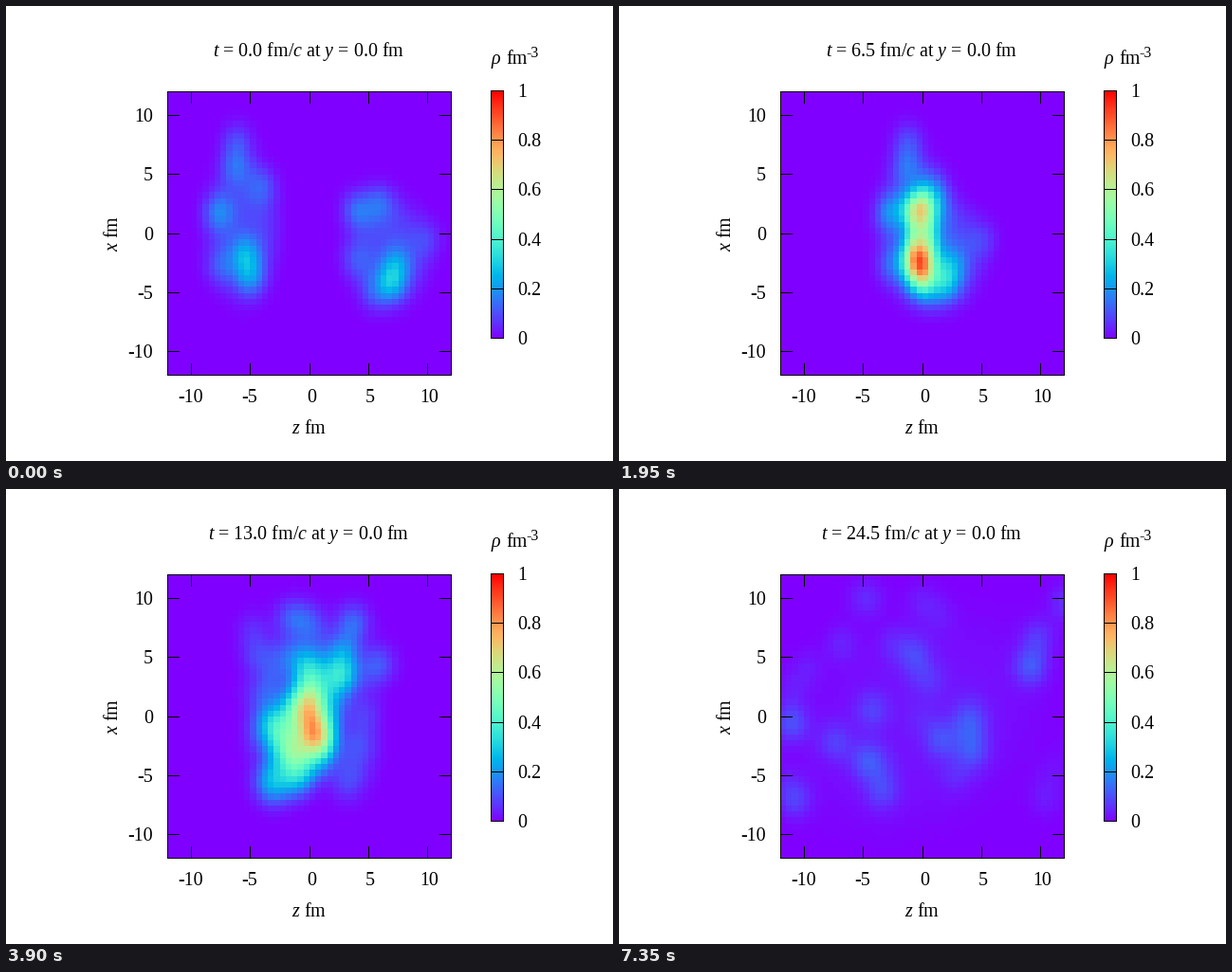
These frames come from a looping animation (640 px wide and 480 px high, 7.5 s). A matplotlib script:

```python
import numpy as np
import matplotlib as mpl
import matplotlib.pyplot as plt
from matplotlib.animation import FuncAnimation

mpl.rcParams.update({
    "font.family": "Liberation Serif",
    "font.size": 14.4,
    "mathtext.fontset": "custom",
    "mathtext.rm": "Liberation Serif",
    "mathtext.it": "Liberation Serif:italic",
})

FRAMES, INTERVAL, DT = 50, 150, 0.5
BEAM = 0.75                 # beam velocity in units of c
T_HIT, T_REF = 8.0, 20.5    # full overlap; time the fragments are given at
LEFT, RIGHT, TOP, BOTTOM = 170, 469, 90, 389

# clumps of the incoming nuclei at t = 0: z, x, peak density
PROJECTILE = [(-6.1, 7.8, .09), (-6.2, 5.7, .11), (-7.7, 1.8, .13),
              (-4, 4, .08), (-5.4, -1.8, .17), (-5, -3.7, .15),
              (-7.6, -2.8, .08)]
TARGET = [(4, 2, .14), (5.9, 2.6, .11), (3.9, -2.2, .07), (6.9, -4.1, .2),
          (7.4, -2.5, .12), (5.5, -5, .07), (10, -.5, .06)]

# the two hot spots: t, z, x, peak density
UPPER = [(4.5, 0, 2.1, .27), (8.5, -.8, 2.1, .22), (13, 0, 1.2, .28),
         (16.5, -.9, .6, .22), (20.5, -1, 2, 0)]
LOWER = [(4.5, -.7, -3.1, .2), (8.5, .2, -2.3, .36), (13, .3, -1, .32),
         (16.5, 1.4, -.1, .33), (20.5, 3.4, .6, .16), (24.5, 4, -.6, .1)]

# bright fragments at T_REF, then a seeded haze of faint ones
FRAGMENTS = [(9.2, 9, .08), (7.4, 6.3, .08), (6.9, 4, .13), (-.5, 5, .08),
             (-5.2, 5.8, .05), (-3.2, .5, .08), (-8.4, -.4, .1),
             (-5.6, -2, .08), (-3.6, -3.5, .1), (-2.6, -5.9, .09),
             (-8.1, -6.7, .08), (1.2, -1.8, .1), (3.2, -2.8, .09),
             (-10.7, 5.8, .05), (14.5, 5, .07)]
rng = np.random.default_rng(4)
haze = rng.uniform([-13, -10, .015], [13, 10, .045], (24, 3))

edges = np.linspace(-12, 12, 49)
Z, X = np.meshgrid(edges, edges)


def ease(t, a, b):
    s = np.clip((t - a) / (b - a), 0, 1)
    return s * s * (3 - 2 * s)


def spot(z, x, peak, wz=.85, wx=1.1):
    return peak * np.exp(-((Z - z) / wz) ** 2 / 2 - ((X - x) / wx) ** 2 / 2)


def body(z, x, peak, rz, rx, shear=0):
    """Flat-topped ellipse with a soft edge."""
    r2 = ((Z - z - shear * X) / rz) ** 2 + ((X - x) / rx) ** 2
    return peak * np.exp(-r2 ** 2)


def nuclei(t):
    dz = BEAM * t
    rho = body(-5.6 + dz, .5, .09, 3, 5.8) + body(6.7 - dz, -1.5, .09, 3.4, 4.5)
    rho += sum(spot(z + dz, x, p) for z, x, p in PROJECTILE)
    rho += sum(spot(z - dz, x, p) for z, x, p in TARGET)
    return rho * (1 - ease(t, 8.5, 12))


def fireball(t):
    age = max(t - 4.5, 0)
    peak = .27 * ease(t, 2.5, 6) / (1 + (max(t - 9, 0) / 7) ** 3)
    rho = body(0, -.4, peak, 1.1 + .03 * age ** 1.9, 3.5 + .28 * age,
               .3 * ease(t, 8.5, 13))
    for track, wz, wx in ((UPPER, .9, 1.15), (LOWER, 1, 1.4)):
        times, *path = np.transpose(track)
        z, x, p = (np.interp(t, times, values) for values in path)
        rho += spot(z, x, p * ease(t, 2, 4.5), wz, wx)
    return rho


def fragments(t):
    if t <= 8.5:
        return 0
    s = (t - T_HIT) / (T_REF - T_HIT)
    gain = ease(t, 8.5, 12) * s ** -.6
    return sum(spot(z * s, x * (.8 + .2 * s), p * gain, .95, 1.1)
               for z, x, p in [*FRAGMENTS, *haze])


def field(t):
    rho = nuclei(t) + fireball(t) + fragments(t)
    # each cell takes the mean of its four corners
    return (rho[1:, 1:] + rho[:-1, 1:] + rho[1:, :-1] + rho[:-1, :-1]) / 4


fig = plt.figure(figsize=(6.4, 4.8), dpi=100, facecolor="white")
ax = fig.add_axes([0, 0, 1, 1])
ax.axis("off")


def line(xs, ys):
    """One-pixel line through pixel columns and rows."""
    ax.plot(np.add(xs, .5), np.add(ys, .5), color="black", lw=.72,
            antialiased=False, snap=False, zorder=3)


def box(x0, x1, y0, y1):
    line([x0, x1, x1, x0, x0], [y0, y0, y1, y1, y0])


def label(x, y, text, ha="center", **kw):
    return ax.text(x, y, text, ha=ha, va="baseline", **kw)


def to_pixel(v, start, end):
    return int(np.interp(v, [-12, 12], [start, end]) + .5)


style = dict(cmap="rainbow", vmin=0, vmax=1, origin="lower",
             interpolation="nearest", aspect="auto")
heat = ax.imshow(field(0), extent=(LEFT, RIGHT + 1, BOTTOM + 1, TOP), **style)
ax.imshow(np.linspace(0, 1, 256)[:, None], extent=(511, 525, 351, 89), **style)

box(LEFT, RIGHT, TOP, BOTTOM)
box(511, 524, 89, 350)

TICK = 12
for v in range(-10, 11, 5):
    px, py = to_pixel(v, LEFT, RIGHT), to_pixel(v, BOTTOM, TOP)
    line([px, px], [BOTTOM, BOTTOM - TICK])
    line([px, px], [TOP, TOP + TICK])
    line([LEFT, LEFT + TICK], [py, py])
    line([RIGHT, RIGHT - TICK], [py, py])
    label(px + (2 if v >= 0 else -.5), 418, str(v))
    label(155, py + 7, str(v), "right")

for k in range(6):
    py = int(350.5 - 52.2 * k)
    line([511, 524], [py, py])
    label(539.5, py + 7, f"{k / 5:g}", "left")

label(319, 451, "$z$ fm")
label(118, 240, "$x$ fm", rotation=90, rotation_mode="anchor")
label(511.5, 61, "ρ", "left", style="italic")
label(527, 61, "fm", "left")
label(548.5, 54.5, "-3", "left", fontsize=11.5)
title = label(319, 53, "")

ax.set_xlim(0, 640)
ax.set_ylim(480, 0)


def update(n):
    t = n * DT
    heat.set_data(field(t))
    title.set_text(f"$t$ = {t:.1f} fm/$c$ at $y$ = 0.0 fm")
    return heat, title


anim = FuncAnimation(fig, update, frames=FRAMES, interval=INTERVAL,
                     repeat=True, repeat_delay=0)
plt.show()
```
